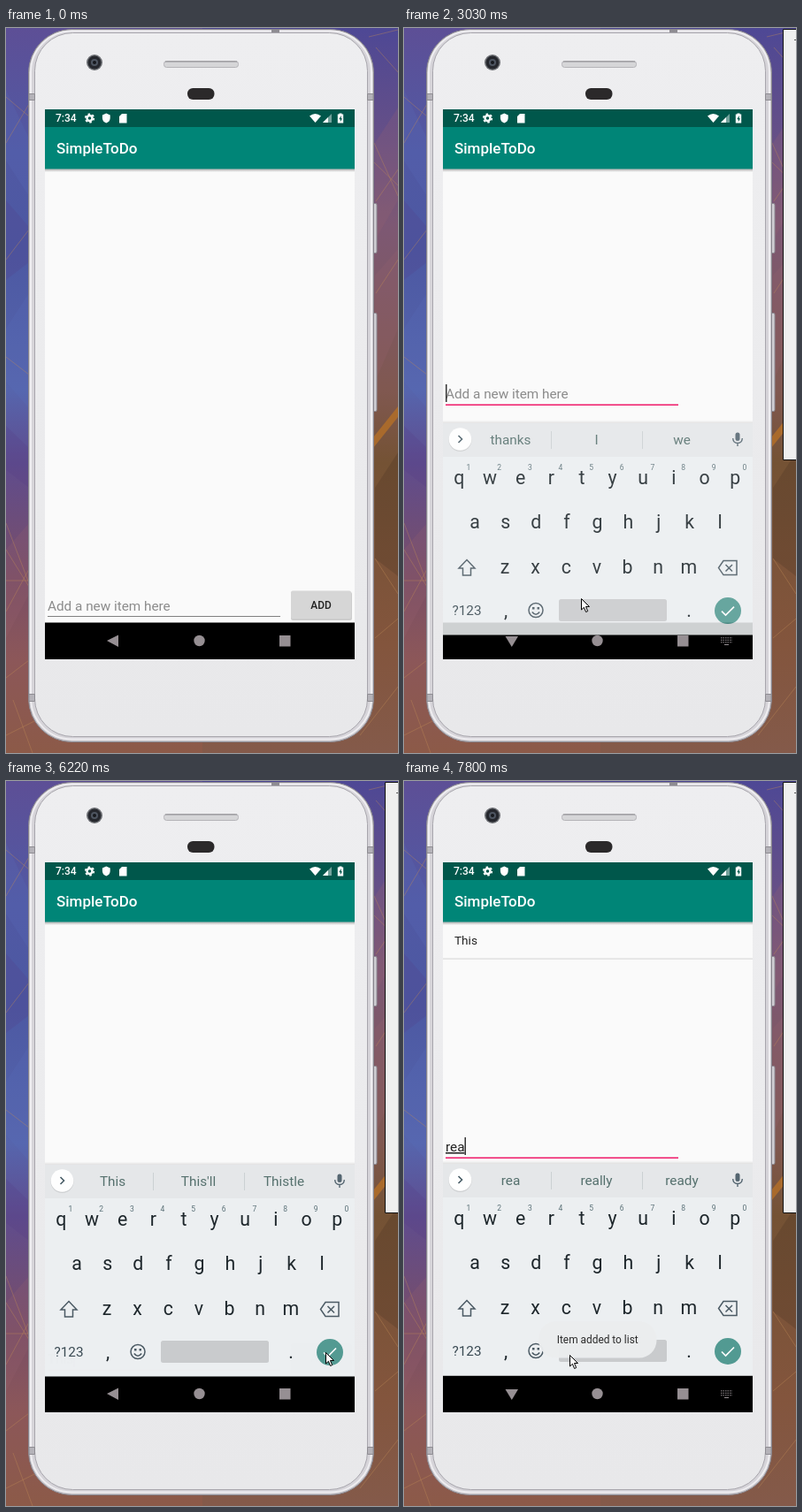
An HTML page that plays this animation: 443 by 820 pixels, repeating every 8 s.

```html
<!DOCTYPE html>
<html lang="en">
<head>
<meta charset="utf-8">
<title>To-do app demo</title>
<style>
  html, body { margin: 0; width: 100%; height: 100%; overflow: hidden; background: #57498b; }
  svg { display: block; width: 443px; height: 820px; font-family: Roboto, sans-serif; }
  .medium { font-weight: 500; }
  .mid { text-anchor: middle; }
</style>
</head>
<body>
<svg viewBox="0 0 443 820">
  <defs>
    <linearGradient id="left" x2="0" y2="1">
      <stop offset="0" stop-color="#5d4f96"/><stop offset=".17" stop-color="#5159a4"/>
      <stop offset=".3" stop-color="#4c58a2"/><stop offset=".5" stop-color="#5665ad"/>
      <stop offset=".6" stop-color="#5f4c8e"/><stop offset=".76" stop-color="#7a4e66"/>
      <stop offset=".87" stop-color="#8c5759"/><stop offset="1" stop-color="#8c5a48"/>
    </linearGradient>
    <linearGradient id="right" x2="0" y2="1">
      <stop offset="0" stop-color="#4e4895"/><stop offset=".14" stop-color="#644f88"/>
      <stop offset=".27" stop-color="#7d5874"/><stop offset=".5" stop-color="#805850"/>
      <stop offset=".6" stop-color="#745234"/><stop offset=".85" stop-color="#83553d"/>
      <stop offset="1" stop-color="#845a4a"/>
    </linearGradient>
    <linearGradient id="face" x2="0" y2="1">
      <stop offset="0" stop-color="#eeeef0"/><stop offset="1" stop-color="#e8e8ea"/>
    </linearGradient>
    <linearGradient id="shade" x2="0" y2="1">
      <stop offset="0" stop-opacity=".3"/><stop offset="1" stop-opacity="0"/>
    </linearGradient>
    <clipPath id="screen"><path d="M44 92H394V714H44Z"/></clipPath>
  </defs>

  <!-- wallpaper -->
  <path fill="url(#left)" d="M0 0H222V820H0Z"/>
  <path fill="url(#right)" d="M222 0H443V820H222Z"/>
  <g opacity=".2">
    <path fill="#5a70bd" d="M0 70 26 125V190L0 150ZM0 340 26 300V430L0 400Z"/>
    <path fill="#553b85" d="M0 195 26 225V265L0 285ZM0 450 26 475V520L0 500Z"/>
    <path fill="#9a6470" d="M0 590 26 560V640L0 690ZM417 130 443 90V195L417 240ZM417 280 443 250V340L417 400Z"/>
    <path fill="#3b2a1e" d="M417 520 443 480V620L417 600Z"/>
  </g>
  <path fill="#a96a2c" d="M415 463 443 428V440L415 475Z"/>
  <g fill="none" stroke="#bf8a56" stroke-width=".8" opacity=".5">
    <path d="M0 78 26 100M0 130 26 86M0 262 26 228M0 372 26 392M0 560 26 628M0 625H26M0 590 26 632M0 660 26 612M0 735 26 715M8 760 30 820M0 800 60 770"/>
    <path d="M418 22 443 50M410 10 443 2M416 152 443 178M418 196 443 160M416 130 443 190M418 300 443 262M417 600 443 640M417 690 443 668M400 800 443 745"/>
  </g>

  <!-- phone -->
  <path fill="#d0ced3" stroke="#8f8c94" d="M415 198.500h3q1 0 1 2v52q0 2-1 2h-3ZM415 322.500h3q1 0 1 2v107q0 2-1 2h-3Z"/>
  <rect x="25.500" y="1.500" width="390" height="806" rx="49" fill="#c9c7cc" stroke="#87848c"/>
  <rect x="28" y="3.500" width="385" height="801" rx="46.500" fill="#d6d4d9" stroke="#efeef1" stroke-width="2"/>
  <rect x="32.500" y="5.500" width="376" height="796" rx="43" fill="url(#face)" stroke="#a7a5ac"/>
  <path fill="#b5b3b9" stroke="#8e8c92" d="M26 74.500h6.500v7H26ZM408.500 74.500h6.500v7h-6.500ZM26 753.500h6.500v8H26ZM408.500 753.500h6.500v8h-6.500Z"/>
  <path stroke="#8e8c92" stroke-width="3" d="M300 3.500h9"/>
  <circle cx="100" cy="39" r="9" fill="#6b6d72"/>
  <circle cx="100" cy="39" r="7.4" fill="#25272d"/>
  <circle cx="100" cy="39" r="4" fill="#4d5561"/>
  <circle cx="100" cy="39" r="2" fill="#16181d"/>
  <rect x="178.5" y="37.5" width="84" height="7" rx="3" fill="#d6d6d8" stroke="#b4b3b7"/>
  <path stroke="#909094" d="M180 38h81"/>
  <rect x="205" y="68" width="30.5" height="13" rx="6.2" fill="#2b292a"/>

  <g clip-path="url(#screen)">
    <path fill="#fafafa" d="M44 92H394V714H44Z"/>
    <g id="row">
      <text x="57" y="185" font-size="13.6" fill="#212121">This</text>
      <path fill="#dcdcdc" d="M44 200.5H394v1.2H44Z"/>
    </g>
    <g id="field">
      <text id="hint" x="47" y="659" font-size="15.3" fill="#8b8b8b">Add a new item here</text>
      <text id="entry" x="47" y="659" font-size="15.3" fill="#222"></text>
      <rect id="underline" x="47" y="665" width="263"/>
      <rect id="caret" y="643" width="1.5" height="20"/>
    </g>
    <g id="button">
      <rect x="322" y="638" width="69" height="32" rx="2" fill="#000" opacity=".18"/>
      <rect x="322" y="636.5" width="68" height="31.5" rx="2" fill="#d6d6d6"/>
      <text x="356" y="656.5" font-size="11.9" class="medium mid" fill="#222">ADD</text>
    </g>
    <path fill="#008577" d="M44 112H394V159.500H44Z"/>
    <path fill="#00574b" d="M44 92H394V112H44Z"/>
    <path fill="url(#shade)" d="M44 159.500H394v3.500H44Z"/>
    <g fill="#fff">
      <text x="57" y="142" font-size="17" class="medium">SimpleToDo</text>
      <text x="56" y="106" font-size="12" class="medium">7:34</text>
      <circle cx="94.5" cy="102" r="3" fill="none" stroke="#fff" stroke-width="2.4"/>
      <circle cx="94.5" cy="102" r="4.8" fill="none" stroke="#fff" stroke-width="1.6" stroke-dasharray="2.5 2.53"/>
      <path d="M113.300 96.500 117.700 98.500V102Q117.500 106 113.300 107.500 109.100 106 108.900 102V98.500Z"/>
      <path d="M131 97h5.500v10.500h-8.500v-7.500Z"/>
      <path d="M343 99.500Q349.500 94.500 356 99.500L349.500 107Z"/>
      <path d="M368 97V107H358Z" opacity=".45"/><path d="M364 101V107H358Z"/>
      <path d="M376.500 96.500h3v1h1.700v10h-6.400v-10h1.700Z"/>
    </g>
    <path fill="#00574b" d="M378.700 99 376.300 103.200h1.500v3l2.200-4h-1.300Z"/>

    <path d="M44 672.500H394V714H44Z"/>
    <g fill="#968f93">
      <path id="back"/>
      <circle cx="218.500" cy="693" r="6.200"/>
      <path d="M309 687h12.500v12.500H309Z"/>
      <g id="switcher" stroke="#968f93" fill="none">
        <path stroke-dasharray="1.500 1" d="M358 689.800h13M358 692.300h13M358 694.800h13"/><path d="M362 697.500h5"/>
      </g>
    </g>

    <g id="keyboard">
      <path fill="url(#shade)" opacity=".35" transform="matrix(1 0 0 -1 0 592.5)" d="M44 159.500H394v3.500H44Z"/>
      <path fill="#eceff1" d="M44 433H394V672.500H44Z"/>
      <path fill="#e5e7e9" d="M44 433H394V471H44Z"/>
      <path stroke="#cbd0d2" d="M166.500 442v20M269.500 442v20"/>
      <circle cx="63.500" cy="452" r="13" fill="#000" opacity=".1"/>
      <circle cx="63.500" cy="451" r="12.800" fill="#fff"/>
      <path d="M61.500 447 65.500 451 61.500 455" fill="none" stroke="#455a64" stroke-width="1.600"/>
      <g fill="#546570">
        <rect x="374.500" y="443.500" width="5" height="9.500" rx="2.500"/>
        <path d="M371.700 450Q372 455.500 377 455.500T382.300 450M377 455.500V459" fill="none" stroke="#546570" stroke-width="1.400"/>
      </g>
      <g id="words" class="mid" font-size="15.3" fill="#55706d"></g>
      <g id="keys" class="mid" font-size="21.3" fill="#1d262b"></g>
      <g id="digits" class="mid" font-size="8.5" fill="#5a7077"></g>
      <g fill="none" stroke="#4a5963" stroke-width="1.500">
        <path d="M71 587.500 80 597H75.500V605H66.500V597H62Z"/>
        <path d="M361 588.500H376V604.500H361L355.500 596.500ZM363.500 593 371 600.500M371 593 363.500 600.500"/>
        <circle cx="149" cy="644.500" r="8"/>
        <path d="M144.800 646.500Q149 652 153.200 646.500"/>
      </g>
      <path fill="#4a5963" d="M145 641h2.500v2.500H145ZM150.500 641h2.500v2.500h-2.500Z"/>
      <text x="71" y="650" font-size="15.3" class="mid" fill="#3a4a53">?123</text>
      <rect x="175" y="632" width="122" height="25" rx="2.500" fill="#c9cbcd"/>
      <circle cx="366" cy="645" r="15" fill="#529a92"/>
      <path d="M359 645.500 363.500 650 373 640.500" fill="none" stroke="#fff" stroke-width="1.700"/>
    </g>

    <g id="toast">
      <rect x="152" y="611" width="133.500" height="41.500" rx="20" fill="#eceeef" opacity=".96"/>
      <text x="218.700" y="636" font-size="11.9" class="mid" fill="#2b2b2b">Item added to list</text>
    </g>
  </g>

  <g id="window">
    <path fill="#efefef" stroke="#111" d="M444 1.500H428.500V488.500H444"/>
    <path stroke="#555" d="M441 13.500h2"/>
  </g>
  <path id="cursor" fill="#fff" stroke="#000" stroke-width="1" d="M.5 .5V13L3.400 10.300 5.600 15.500 7.700 14.600 5.500 9.500H9.500Z"/>
</svg>

<script>
const LOOP = 8000, STEP = 40;
const el = id => document.getElementById(id);
const show = (id, on) => el(id).style.display = on ? '' : 'none';
const between = (t, ...spans) => spans.some(([a, b]) => t >= a && t < b);

function set(id, attributes) {
  for (const name in attributes) el(id).setAttribute(name, attributes[name]);
}

function addText(parent, x, y, text = '') {
  const node = document.createElementNS('http://www.w3.org/2000/svg', 'text');
  node.setAttribute('x', x);
  node.setAttribute('y', y);
  node.textContent = text;
  return el(parent).appendChild(node);
}

const keyRow = (letters, x, y) =>
  [...letters].forEach((c, i) => addText('keys', x + i * 34.65, y, c));
keyRow('qwertyuiop', 62.3, 502);
keyRow('asdfghjkl', 80, 552);
keyRow('zxcvbnm', 114, 603);
addText('keys', 115, 652, ',');
addText('keys', 322, 652, '.');
[...'1234567890'].forEach((d, i) => addText('digits', 73 + i * 34.65, 486, d));
const wordSlots = [120.5, 217.5, 314].map(x => addText('words', x, 457));

// Value of the last entry that has started.
const latest = (table, t) => table.findLast(([start]) => start <= t)[1];

function track(keys, t, ease = u => u) {
  const i = keys.findLastIndex(([start]) => start <= t);
  if (i < 0) return keys[0].slice(1);
  const [start, ...from] = keys[i];
  if (i === keys.length - 1) return from;
  const [end, ...to] = keys[i + 1];
  const u = ease(Math.floor((t - start) / STEP) * STEP / (end - start));
  return from.map((v, k) => v + (to[k] - v) * u);
}
const smooth = u => u * u * (3 - 2 * u);

const entries = [[0, ''], [4520, 'T'], [4590, 'Th'], [4650, 'Thi'], [4720, 'This'],
  [6730, ''], [7610, 'r'], [7700, 're'], [7800, 'rea']];
const suggestions = [[0, 'thanks I we'], [4520, 'T The This'], [4590, 'Th The This'],
  [4650, 'Thi This Think'], [4720, "This This'll Thistle"], [6730, 'thanks I we'],
  [7610, 'r really right'], [7700, 're really ready'], [7800, 'rea really ready']];
const keyboardKeys = [[0, 0], [2979, 0], [2980, .5], [3030, .78], [3070, 1], [6180, 1],
  [6220, .95], [6340, 0], [7329, 0], [7330, .25], [7370, .5], [7450, 1]];
const toastKeys = [[6770, 0], [6930, 1]];
const cursorKeys = [[710, 86, 0], [750, 86, 0], [1040, 95, 0], [1480, 202, 264],
  [2090, 202, 264], [2850, 200, 645], [3070, 200, 645], [3400, 248, 596], [5190, 248, 596],
  [5590, 381, 714], [5990, 361, 646], [6810, 361, 646], [7290, 187, 649]];

function render(t) {
  const raised = between(t, [2980, 6130], [7330, LOOP]);
  const focused = t >= 2890;
  const text = latest(entries, t);

  show('row', t >= 6730);
  show('window', t >= 1820);
  show('button', !raised);
  set('field', { transform: `translate(0 ${raised ? -240 : 0})` });
  show('hint', !text);
  el('entry').textContent = text;
  set('entry', { 'text-decoration': raised ? 'underline' : 'none' });
  set('underline', focused ? { fill: '#f01a69', y: 665.5, height: 1.5 }
                           : { fill: '#808080', y: 665, height: 1 });

  show('caret', between(t, [2890, 3800], [4280, 5190], [5690, 6690], [7490, LOOP]));
  set('caret', {
    x: 47 + (text ? el('entry').getComputedTextLength() : 0),
    fill: between(t, [4280, 6690]) ? '#e0185f' : '#333',
  });

  set('back', { d: raised ? 'M114.500 688H129L121.800 700Z' : 'M114 693 127 686.500V700Z' });
  show('switcher', raised);

  const [opened] = track(keyboardKeys, t);
  show('keyboard', opened > 0);
  set('keyboard', {
    opacity: smooth(opened),
    transform: `translate(0 ${205 * (1 - opened) ** 1.77})`,
  });
  latest(suggestions, t).split(' ').forEach((word, i) => wordSlots[i].textContent = word);

  set('toast', { opacity: track(toastKeys, t)[0] });

  show('cursor', between(t, [710, 750], [1040, LOOP]));
  set('cursor', { transform: `translate(${track(cursorKeys, t, smooth)})` });
}

function frame() {
  render(performance.now() % LOOP);
  requestAnimationFrame(frame);
}
frame();
</script>
</body>
</html>
```
